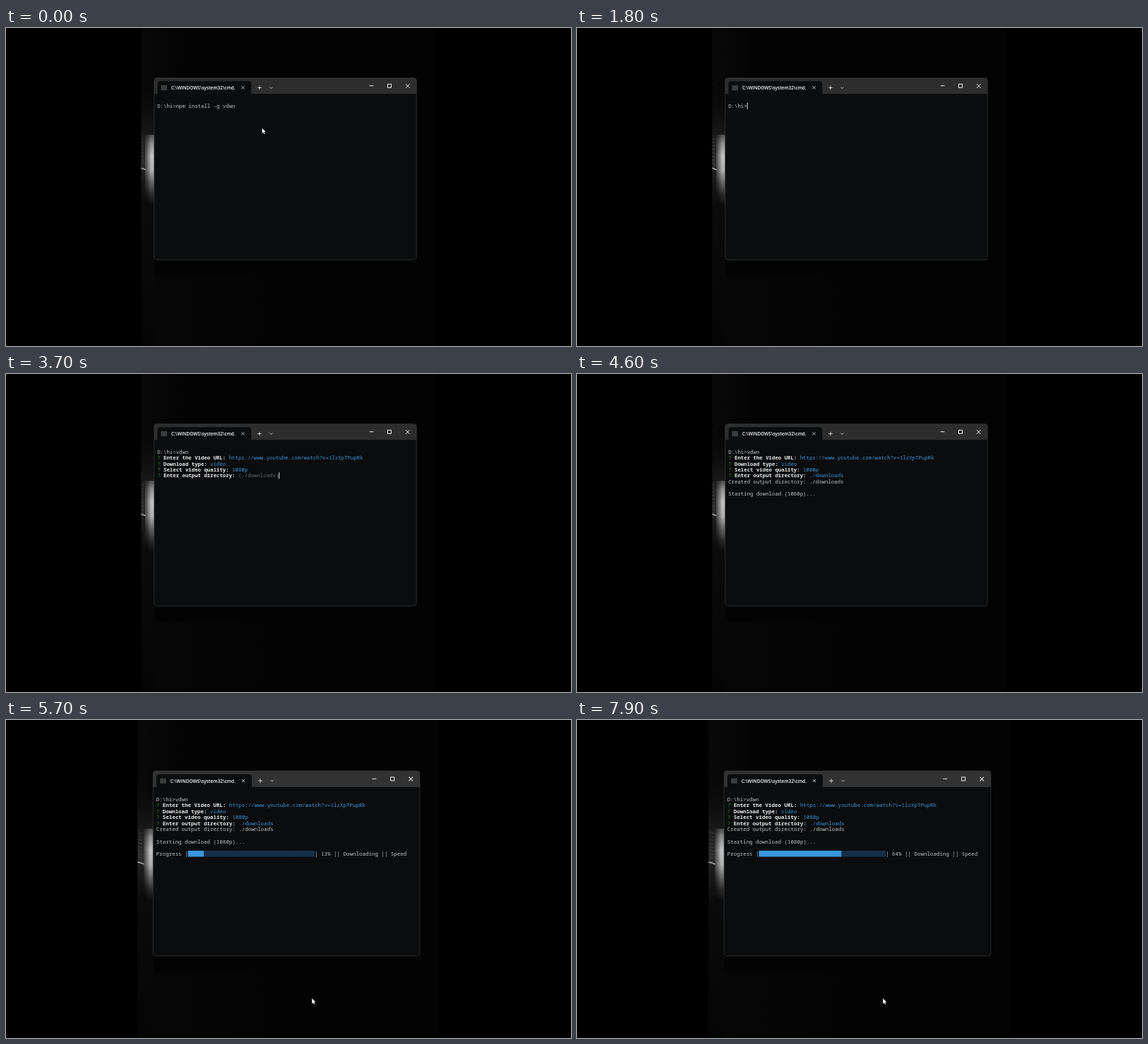
An HTML page with a canvas for the animation above (8000 ms loop, 800 by 450 pixels).

```html
<!DOCTYPE html>
<html lang="en">
<head>
<meta charset="utf-8">
<title>Terminal download</title>
<style>
html, body { margin: 0; width: 100%; height: 100%; overflow: hidden; background: #000; }
canvas { display: block; width: 800px; height: 450px; }
</style>
</head>
<body>
<canvas id="stage" width="800" height="450"></canvas>
<script>
const ctx = document.getElementById('stage').getContext('2d');
const LOOP = 8000, STEP = 100;
const CELL = 4.413, ROW = 8.4, LEFT = 214.2, BASE = 112.7;
const MONO = '"Noto Sans Mono", "DejaVu Sans Mono", monospace';
const SANS = '"Open Sans", "Noto Sans", sans-serif';
const GREY = '#c4c4c4', WHITE = '#ececec', GREEN = '#2f8a34', BLUE = '#3a96dd', DIM = '#6a6a6a';
const URL_TEXT = 'https://www.youtube.com/watch?v=1lzXpTPupRk';

const clamp = v => Math.max(0, Math.min(1, v));
const lerp = (a, b, k) => a + (b - a) * k;

function rect(x, y, w, h, fill) {
  ctx.fillStyle = fill;
  ctx.fillRect(x, y, w, h);
}

function line(width, color, ...points) {
  ctx.beginPath();
  points.forEach(([x, y], i) => i ? ctx.lineTo(x, y) : ctx.moveTo(x, y));
  ctx.lineWidth = width;
  ctx.strokeStyle = color;
  ctx.stroke();
}

function gradient(x0, y0, x1, y1, ...stops) {
  const g = ctx.createLinearGradient(x0, y0, x1, y1);
  stops.forEach(([at, color]) => g.addColorStop(at, color));
  return g;
}

// Set ten times larger and scaled down, so that advances stay fractional.
function text(str, x, y, size, weight, family, fill) {
  ctx.save();
  ctx.translate(x, y);
  ctx.scale(.1, .1);
  ctx.font = `${weight} ${size * 10}px ${family}`;
  ctx.fillStyle = fill;
  ctx.fillText(str, 0, 0);
  ctx.restore();
}

function mono(str, col, row, color) {
  const weight = color === WHITE ? 700 : 400;
  text(str, LEFT + col * CELL, BASE + row * ROW, CELL / .6, weight, MONO, color);
}

function printRow(parts, row) {
  let col = 0;
  for (const [str, color] of parts) {
    mono(str, col, row, color);
    col += str.length;
  }
  return col;
}

const ask = (label, answer = '', color = BLUE) =>
  [['? ', GREEN], [label + ' ', WHITE], [answer, color]];
const plain = str => [[str, GREY]];

function choices(list, picked) {
  return list.map((name, i) => i === picked ? [['> ' + name, BLUE]] : plain('  ' + name));
}

function screen(t) {
  if (t < 1200) return { rows: [plain('D:\\hi>npm install -g vdwn')] };
  if (t < 2500) {
    const typed = 'vdwn'.slice(0, Math.max(0, (t - 1900) / STEP));
    return { rows: [plain('D:\\hi>' + typed)], caret: true };
  }
  const rows = [plain('D:\\hi>vdwn'), ask('Enter the Video URL:', t < 2600 ? '' : URL_TEXT)];
  if (t < 2700) return { rows, caret: true };
  if (t < 2900) {
    rows.push(ask('Download type:', '(Use arrow keys)', DIM), ...choices(['video'], 0));
    return { rows };
  }
  rows.push(ask('Download type:', 'video'));
  if (t < 3400) {
    const moved = t >= 3200;
    rows.push(ask('Select video quality:', moved ? '' : '(Use arrow keys)', DIM),
      ...choices(['1440p', '1080p', '720p', 'best'], +moved));
    return { rows };
  }
  rows.push(ask('Select video quality:', '1080p'));
  if (t < 3900) {
    rows.push(ask('Enter output directory:', '(./downloads)', DIM));
    return { rows, caret: true };
  }
  rows.push(ask('Enter output directory:', './downloads'),
    plain('Created output directory: ./downloads'), [],
    plain('Starting download (1080p)...'));
  return { rows };
}

function percent(t) {
  const keys = [[5200, 0], [5700, 13], [6700, 25], [7900, 64]];
  const i = t < 5700 ? 0 : t < 6700 ? 1 : 2;
  const [t0, p0] = keys[i], [t1, p1] = keys[i + 1];
  return Math.round(lerp(p0, p1, clamp((t - t0) / (t1 - t0))));
}

function progress(t) {
  const p = percent(t), row = 9, cells = 40;
  const x = LEFT + 10 * CELL, y = BASE + row * ROW - 6.6;
  const full = Math.round(p / 100 * cells) * CELL, width = cells * CELL;
  mono('Progress |', 0, row, GREY);
  rect(x, y, width, ROW, '#14293f');
  ctx.fillStyle = '#1f4a70';
  for (let i = 0; i < cells * 2; i++)
    for (let j = 0; j < 4; j++)
      ctx.fillRect(x + (i + (j % 2) / 2) * CELL / 2, y + .6 + j * 2.1, .9, .9);
  rect(x, y, full, ROW, BLUE);
  mono(`| ${p}% || Downloading || Speed`, 10 + cells, row, GREY);
}

function wallpaper() {
  rect(150, 0, 500, 450, '#030304');
  rect(180, 0, 70, 150, gradient(190, 0, 250, 0, [0, '#080808'], [.5, '#060607'], [1, '#030304']));
  rect(180, 250, 30, 200, gradient(0, 250, 0, 450, [0, '#0b0b0b'], [1, '#040405']));
  rect(210, 350, 170, 100, gradient(210, 0, 380, 0, [0, '#060607'], [1, '#030304']));
  line(.8, '#111', [186, 84], [210, 66]);
  rect(180, 80, 30, 71, gradient(0, 80, 0, 151, [0, '#0b0b0b00'], [1, '#181818']));
  rect(180, 151, 18, 100, gradient(0, 151, 0, 251,
    [0, '#1c1c1c'], [.4, '#2c2c2c'], [.55, '#1c1c1c'], [1, '#0b0b0b']));
  for (let y = 156; y < 198; y += 5) line(.8, '#484848', [190, y], [195, y + 1.5]);
  line(1.4, '#aaa', [186, 197], [192, 198.5], [199, 201]);
  rect(197.5, 151, 13, 100, gradient(0, 151, 0, 251,
    [0, '#4b4b4b'], [.12, '#8e8e8e'], [.3, '#c2c2c2'], [.5, '#b0b0b0'],
    [.68, '#646464'], [.85, '#2a2a2a'], [1, '#0b0b0b']));
  rect(197.5, 151, 8, 100, gradient(197.5, 0, 205.5, 0, [0, '#000000a0'], [1, '#00000000']));
}

function panel(zoom) {
  ctx.beginPath();
  ctx.roundRect(209.8, 70.8, 371.4, 257.4, 4);
  ctx.save();
  ctx.clip();
  rect(209, 70, 373, 259, '#0b0c0d');
  rect(209, 70, 373, 23.2, zoom > .5 ? '#323232' : '#2d2d2d');
  ctx.restore();
  ctx.lineWidth = .7;
  ctx.strokeStyle = '#3b3b3b';
  ctx.stroke();

  ctx.beginPath();
  ctx.roundRect(214.5, 75.3, 132.7, 18.2, [4, 4, 0, 0]);
  ctx.fillStyle = '#0b0c0d';
  ctx.fill();
  rect(219.5, 81, 8.5, 7.2, '#3c3c3c');
  text('C:\\WINDOWS\\system32\\cmd.', 234, 87.1, 6.45, 600, SANS, '#fff');

  const cross = (x, y, r, w) => {
    line(w, '#e4e4e4', [x - r, y - r], [x + r, y + r]);
    line(w, '#e4e4e4', [x - r, y + r], [x + r, y - r]);
  };
  cross(335.5, 84.4, 2.1, .8);
  line(.9, '#ddd', [356.2, 84.5], [361.8, 84.5]);
  line(.9, '#ddd', [359, 81.7], [359, 87.3]);
  line(.9, '#ccc', [373.3, 83.5], [375.4, 85.6], [377.5, 83.5]);
  line(1, '#e8e8e8', [514.7, 81.7], [520.5, 81.7]);
  ctx.strokeStyle = '#e8e8e8';
  ctx.strokeRect(540.5, 79.4, 5, 5);
  cross(568.7, 82, 2.8, 1);
}

function pointer(x, y) {
  ctx.beginPath();
  [[0, 0], [0, 7.4], [1.7, 5.9], [2.8, 8.4], [4, 7.9], [2.9, 5.4], [5.2, 5.3]]
    .forEach(([dx, dy]) => ctx.lineTo(x + dx, y + dy));
  ctx.closePath();
  ctx.lineWidth = .8;
  ctx.strokeStyle = '#000';
  ctx.stroke();
  ctx.fillStyle = '#fff';
  ctx.fill();
}

function draw(t) {
  const k = clamp((t - 4700) / 600), zoom = k * k * (3 - 2 * k);
  const scale = lerp(1, 1.0172, zoom), edge = lerp(191.4, 186.2, zoom);
  ctx.setTransform(1, 0, 0, 1, 0, 0);
  rect(0, 0, 800, 450, '#000');
  ctx.save();
  ctx.beginPath();
  ctx.rect(edge, 0, 800 - 2 * edge, 450);
  ctx.clip();
  ctx.transform(scale, 0, 0, scale, -5.19 * zoom, .1 * zoom);
  wallpaper();
  panel(zoom);

  const { rows, caret } = screen(t);
  let col = 0;
  rows.forEach((parts, i) => col = printRow(parts, i));
  if (caret) rect(LEFT + col * CELL, BASE + (rows.length - 1) * ROW - 7, .9, 9, '#fff');
  if (t >= 5200) progress(t);
  ctx.restore();

  if (t < 1200) pointer(362.6, 141.7);
  if (t >= 5000) pointer(433.2, 394);
}

const start = performance.now();
function frame() {
  const t = (performance.now() - start) % LOOP;
  draw(Math.floor(t / STEP) * STEP);
  requestAnimationFrame(frame);
}
frame();
</script>
</body>
</html>
```
